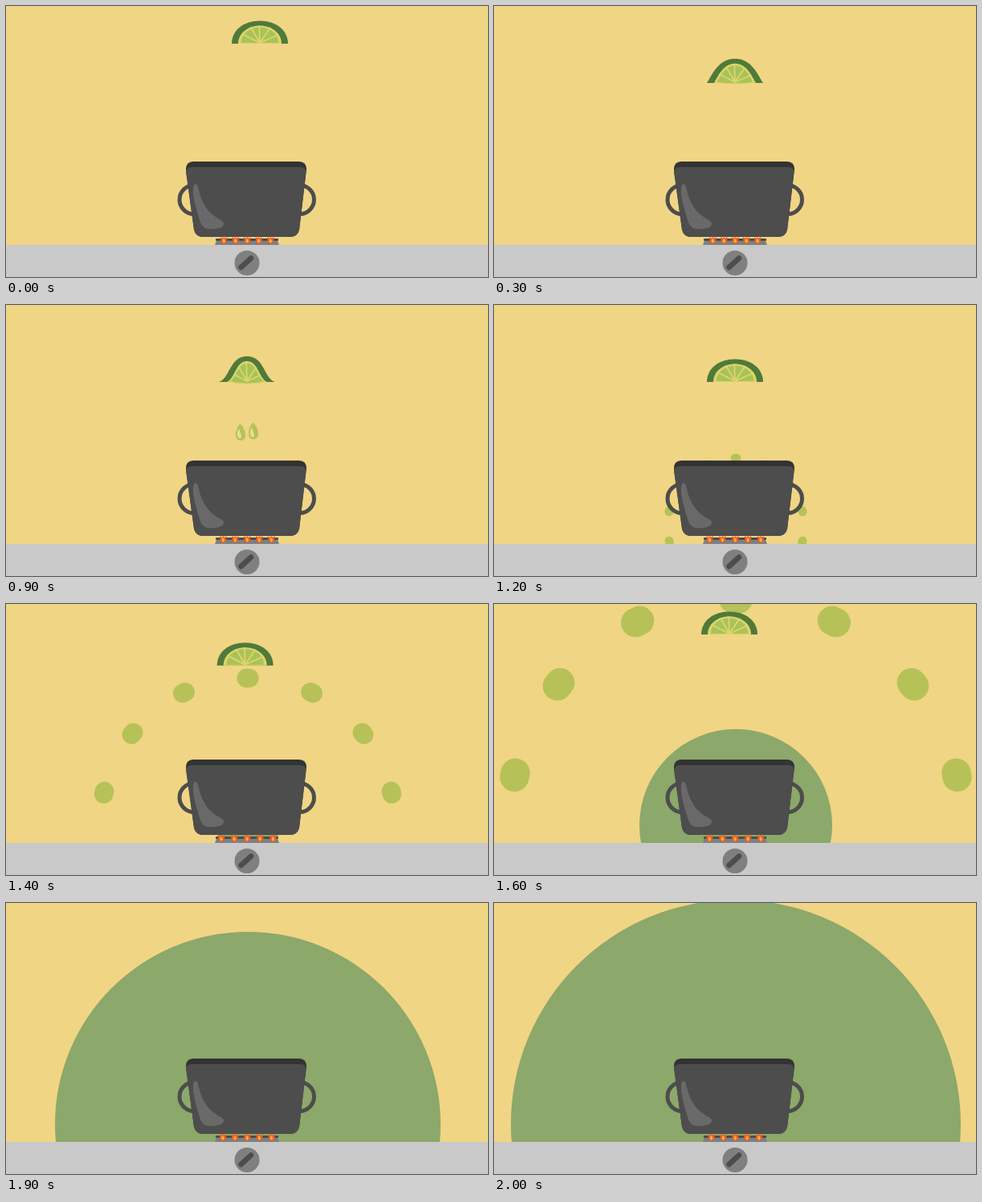
Write an HTML page with a canvas that moves like this. It is 600 px wide and 338 px high and loops after 2100 ms.

```html
<!DOCTYPE html>
<html>
<head>
<meta charset="utf-8">
<style>
html, body { margin: 0; height: 100%; overflow: hidden; background: #f0d584; }
canvas { display: block; width: 100%; height: 100%; }
</style>
</head>
<body>
<canvas id="stage" width="600" height="338"></canvas>
<script>
const ctx = document.getElementById('stage').getContext('2d');
const LOOP = 2100, STEP = 100;
const clamp = v => Math.max(0, Math.min(1, v));
const ramp = (t, from, to) => clamp((t - from) / (to - from));
const mix = (a, b, k) => a + (b - a) * k;

function fill(path, color) {
  ctx.fillStyle = color;
  ctx.fill(new Path2D(path));
}

function line(x1, y1, x2, y2, width, color, cap = 'round') {
  ctx.beginPath();
  ctx.moveTo(x1, y1);
  ctx.lineTo(x2, y2);
  ctx.lineWidth = width;
  ctx.lineCap = cap;
  ctx.strokeStyle = color;
  ctx.stroke();
}

function disc(x, y, r, color) {
  ctx.beginPath();
  ctx.arc(x, y, r, 0, 7);
  ctx.fillStyle = color;
  ctx.fill();
}

function at(x, y, scale, draw) {
  ctx.save();
  ctx.translate(x, y);
  ctx.scale(scale, scale);
  draw();
  ctx.restore();
}

// Symmetric arch whose sides bend inwards as k goes from 0 to 1
function arch(rest, bent, k) {
  const [x, x1, y1, x2, h, sag] = rest.map((v, i) => mix(v, bent[i], k));
  return `M${-x},0C${-x1},${-y1} ${-x2},${-h} 0,${-h}C${x2},${-h} ${x1},${-y1} ${x},0Q0,${sag} ${-x},0Z`;
}

function lime(t) {
  const drop = ramp(t, 0, 200), rise = Math.max(0, t - 1300) / 300;
  const k = ramp(t, 200, 400) - ramp(t, 950, 1200);
  at(316 - 16 * drop - 7 * rise, 47 + 49 * drop - 58 * rise, 1, () => {
    const inner = arch([27, 27, 13, 15, 22.5, 0], [25, 15, 4, 14, 26, 6], k);
    fill(arch([35, 35, 17, 20, 28.5, 0], [35, 21, 4, 22, 32, 0], k), '#4f7a3a');
    fill(inner, '#dcd46c');
    ctx.save();
    ctx.clip(new Path2D(inner));
    ctx.translate(0, -1);
    ctx.scale(.86, .86);
    fill(inner, '#a9c359');
    for (const deg of [24, 56, 92, 120, 153]) {
      const a = deg * Math.PI / 180;
      line(0, 0, 36 * Math.cos(a), -36 * Math.sin(a), 2.2, '#dcd46c');
    }
    ctx.restore();
  });
}

function drops(t) {
  if (t < 520 || t > 1080) return;
  const fall = 13 * ((t - 520) / 180) ** 2, size = ramp(t, 480, 680);
  for (const [x, y] of [[292, 100.5], [308, 99]]) {
    at(x, y + fall, size, () => {
      fill('M-.5,-10.5C3,-8 6,-1 6,4C6,8 3,10.5 0,10.5C-4,10.5 -6,7 -6,3C-6,-2 -3,-8 -.5,-10.5Z', '#b5c257');
      fill('M-2,-4C-5,1 -5,6 -1,8C2,8 1,4 0,2C-1,0 -1,-3 -2,-4Z', '#e6e09a');
    });
  }
}

function splash(t) {
  const r = 85 + .4925 * (t - 1200);
  if (r <= 0) return;
  for (let i = 0; i < 14; i++) {
    const a = Math.PI * (i / 7 - .5);
    const c = Math.cos(a), s = Math.sin(a), d = r * .0095;
    const x = 301 + r * c, y = 276 + r * s;
    line(x + s * d, y - c * d, x - s * d, y + c * d, r * .129, '#b6c257');
  }
}

function pot() {
  ctx.strokeStyle = '#4d4d4d';
  ctx.lineWidth = 5;
  for (const x of [234, 365.5]) {
    ctx.beginPath();
    ctx.arc(x, 241.5, 18, 0, 7);
    ctx.stroke();
  }
  const sides = 'L365,279Q363,288 353,288H246Q236,288 234,279L224,';
  fill(`M233,194H365Q374,194 374,204${sides}204Q224,194 233,194Z`, '#333');
  fill(`M231,201H367Q373,201 373.5,207${sides}207Q225,201 231,201Z`, '#4d4d4d');
  fill('M236,222C240,222 240,236 246,246C252,259 263,264 270,269C274,274 266,278 258,278C250,279 245,277 242,270C238,256 232,240 233,228Q233,222 236,222Z', '#696969');
}

function burner(t) {
  fill('M263,290H337L340,298H260Z', '#7f7f7f');
  line(261, 291.5, 339, 291.5, 2.5, '#444', 'butt');
  const spread = 15 + 1.1 * Math.cos(2 * Math.PI * (t - 1420) / LOOP);
  for (let i = -2; i <= 2; i++) {
    at(300.3 + i * spread, 292, 1, () => {
      fill('M-4,-4L-1.5,-2L0,-4L1.5,-2L4,-4C4.5,1 3,4.5 0,4.5C-3,4.5 -4.5,1 -4,-4Z', '#f15a24');
      fill('M-.5,-2C2,0 2.5,3 0,3.5C-2.5,3 -2,0 -.5,-2Z', '#fbb03b');
    });
  }
}

function stove() {
  ctx.fillStyle = '#c9c9ca';
  ctx.fillRect(0, 298, 600, 40);
  disc(300, 320.5, 15.5, '#7f7f7f');
  line(292.5, 326, 305, 314.5, 6.5, '#4d4d4d');
}

function frame() {
  const t = Math.floor(performance.now() % LOOP / STEP) * STEP;
  ctx.fillStyle = '#f0d584';
  ctx.fillRect(0, 0, 600, 338);
  disc(301, 276, Math.max(0, .4 * (t - 1300)), '#8ca86a');
  splash(t);
  drops(t);
  lime(t);
  burner(t);
  pot();
  stove();
  requestAnimationFrame(frame);
}
frame();
</script>
</body>
</html>
```
